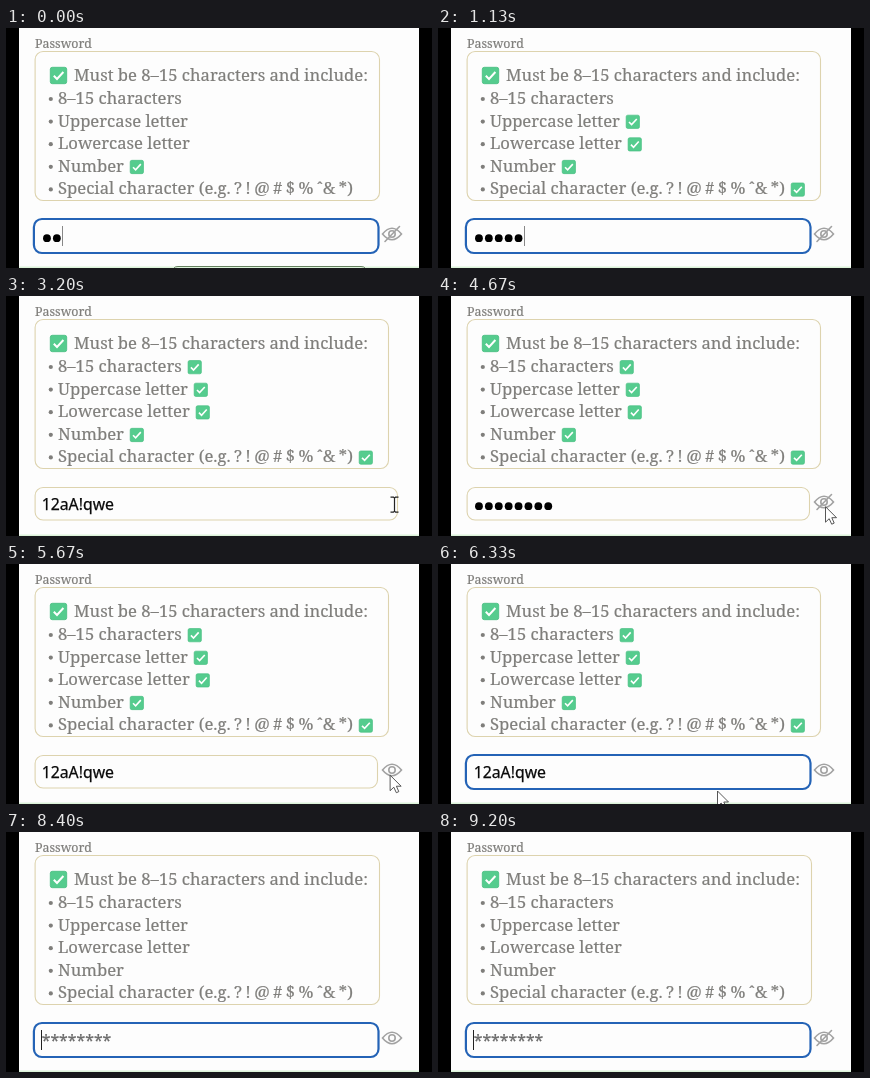
These frames come from a looping animation (426x240 px, 9270 ms). An HTML page:

```html
<!DOCTYPE html>
<html lang="en">
<head>
<meta charset="utf-8">
<title>Password rules</title>
<style>
  html, body { margin: 0; width: 100%; height: 100%; overflow: hidden; background: #000; }
  svg { display: block; width: 426px; height: 240px; }
  .serif { font-family: "Noto Serif", serif; font-size: 16.65px; fill: #7f7e7b; stroke: #7f7e7b; stroke-width: .2; }
  .label { font-size: 12.4px; }
  .symbols { word-spacing: -.9px; }
  .sans { font-family: "Noto Sans", sans-serif; font-size: 15.8px; stroke-width: .25; }
  .box { fill: #fdfdfd; stroke: #ddd3ae; stroke-width: 1.1; }
  .box.focused { stroke: #2463b6; stroke-width: 2.2; }
  .eye { fill: none; stroke: #a2a2a2; stroke-width: 1.6; stroke-linecap: round; }
</style>
</head>
<body>
<svg viewBox="0 0 426 240">
  <defs>
    <g id="tick">
      <rect x=".3" y=".3" width="16.4" height="16.4" rx="2" fill="#55cc8e" stroke="#44bd7e" stroke-width=".8"/>
      <path d="M3.8 8.8 L7 12 L13.4 5" fill="none" stroke="#fff" stroke-width="2"/>
    </g>
  </defs>
  <rect x="13" width="400" height="240" fill="#fdfdfd"/>
  <rect x="13" y="238.5" width="400" height="1.5" fill="#dcf3d9"/>
  <path id="button" d="M168 240 Q169 238.5 172 238.5 H355 Q358 238.5 359 240" fill="none" stroke="#64805f"/>
  <text class="serif label" x="29" y="20">Password</text>
  <rect id="panel" class="box" x="29.1" y="23.5" height="149" rx="8"/>
  <use href="#tick" x="44" y="39"/>
  <text class="serif" x="68" y="53">Must be 8–15 characters and include:</text>
  <g id="rules"></g>
  <rect id="field" rx="8"/>
  <text id="value" class="sans" x="35.7" y="214"></text>
  <g id="dots"></g>
  <rect id="caret" y="198" width="1" height="20"/>
  <g id="eye" class="eye">
    <path d="M376.5 206 Q386 194.5 395.5 206 Q386 217.5 376.5 206Z"/>
    <circle cx="386" cy="206" r="3.2"/>
    <path id="slash" d="M393.5 198.5 L379 213.5"/>
  </g>
  <path id="arrow" d="M0 0 V15.5 L3.7 12 L6.2 17.5 L8.7 16.4 L6.3 11 H11Z" fill="#fff" stroke="#444" stroke-width=".9"/>
  <path id="beam" d="M-3 -9.5 H0 L1 -8.5 L2 -9.5 H5 M1 -8.5 V4.5 M-3 5.5 H0 L1 4.5 L2 5.5 H5" fill="none" stroke="#222" stroke-width="1.2"/>
</svg>
<script>
const LOOP = 9270, LEFT = 36, PITCH = 9.9, WORD = "12aA!qwe";
// key moments in ms
const KEY_START = 460, KEY_GAP = 270, TYPED = KEY_START + 5 * KEY_GAP;
const BLUR = 2350, FOCUS = 5770;
const PRESS = 2930, PRESS_GAP = 1050, EYE_GONE = 450;
const ERASE = 6660, ERASE_GAP = 73, ERASED = ERASE + 6 * ERASE_GAP, CLEARED = 7930;
const MASKED = 8530;

const $ = id => document.getElementById(id);

function add(parent, name, attrs, content = "") {
  const node = document.createElementNS("http://www.w3.org/2000/svg", name);
  set(node, attrs);
  node.innerHTML = content;
  parent.append(node);
  return node;
}
function set(node, attrs) {
  for (const key in attrs) node.setAttribute(key, attrs[key]);
}
function show(node, on) { node.style.display = on ? "" : "none"; }
function ease(t, from, to) {
  const u = Math.min(1, Math.max(0, (t - from) / (to - from)));
  return u * u * (3 - 2 * u);
}

const rules = [
  ["8–15 characters", /.{8}/],
  ["Uppercase letter", /[A-Z]/],
  ["Lowercase letter", /[a-z]/],
  ["Number", /\d/],
  ['Special character (e.g.<tspan class="symbols"> ? ! @ # $ % ˆ&amp; *)</tspan>', /!/]
].map(([label, pattern], i) => {
  const y = 76 + i * 22.6;
  add($("rules"), "circle", { cx: 44.8, cy: y - 5, r: 2.1, fill: "#7f7e7b" });
  const text = add($("rules"), "text", { x: 52, y, class: "serif" }, label);
  const x = 58 + text.getComputedTextLength();
  const tick = add($("rules"), "use", { href: "#tick", transform: `translate(${x} ${y - 11.7}) scale(.81)` });
  return { tick, pattern };
});
const dots = [...WORD].map((c, i) =>
  add($("dots"), "circle", { cx: LEFT + PITCH * (i + 0.5), cy: 210.2, r: 3.9 }));

function typedCount(t) {
  if (t >= CLEARED) return 0;
  if (t >= ERASE) return Math.max(1, 7 - Math.floor((t - ERASE) / ERASE_GAP));
  return Math.min(8, 3 + Math.max(-1, Math.floor((t - KEY_START) / KEY_GAP)));
}

function pointerAt(t) {
  const enter = ease(t, BLUR, 2740), leave = ease(t, 5600, 6270), exit = ease(t, 6400, 6600);
  return [412 - 24.5 * enter - 108 * leave - 17 * exit, 238 - 27.3 * enter + 16.3 * leave + 17 * exit];
}

function caretOn(t) {
  const since = t - Math.max(...[TYPED, FOCUS, ERASED, CLEARED].filter(at => at <= t));
  return t < TYPED || (t >= ERASE && t < ERASED) || since % 1060 < 530;
}

function draw(t) {
  const count = typedCount(t), value = WORD.slice(0, count);
  const focused = t < BLUR || t >= FOCUS;

  // each press on the eye flips the mask and briefly removes the icon
  const presses = Math.min(3, Math.max(0, 1 + Math.floor((t - PRESS) / PRESS_GAP)));
  const sincePress = t - PRESS - (presses - 1) * PRESS_GAP;
  const hasEye = !presses || sincePress > EYE_GONE;
  const plain = presses % 2 === 1 && t < MASKED;

  rules.forEach(r => show(r.tick, r.pattern.test(value)));
  set($("panel"), { width: value.includes("!") ? 353.4 : 344.4 });
  show($("button"), t < KEY_START);

  const right = hasEye ? 371.5 : 391.5;
  set($("field"), focused
    ? { class: "box focused", x: 27.9, y: 191, width: 344.6, height: 34 }
    : { class: "box", x: 29.1, y: 191.5, width: right - 29.1, height: 32.5 });

  const text = $("value"), ink = count ? "#0a0a0a" : "#6b6b6b";
  text.textContent = !count ? "*".repeat(8) : plain ? value : "";
  set(text, { fill: ink, stroke: ink });
  dots.forEach((dot, i) => show(dot, !plain && i < count));

  show($("caret"), focused && caretOn(t));
  const end = !count ? -1 : plain ? text.getComputedTextLength() : count * PITCH;
  set($("caret"), { x: Math.round(LEFT + end), fill: count ? "#888" : "#222" });

  show($("eye"), hasEye);
  show($("slash"), !plain);

  const [x, y] = pointerAt(t);
  const present = t > BLUR && t < 6600;
  const inField = x < right && y > 191 && y < 225;
  show($("arrow"), present && !inField);
  show($("beam"), present && inField);
  for (const id of ["arrow", "beam"]) set($(id), { transform: `translate(${x} ${y})` });
}

function frame() {
  draw(performance.now() % LOOP);
  requestAnimationFrame(frame);
}
frame();
</script>
</body>
</html>
```
